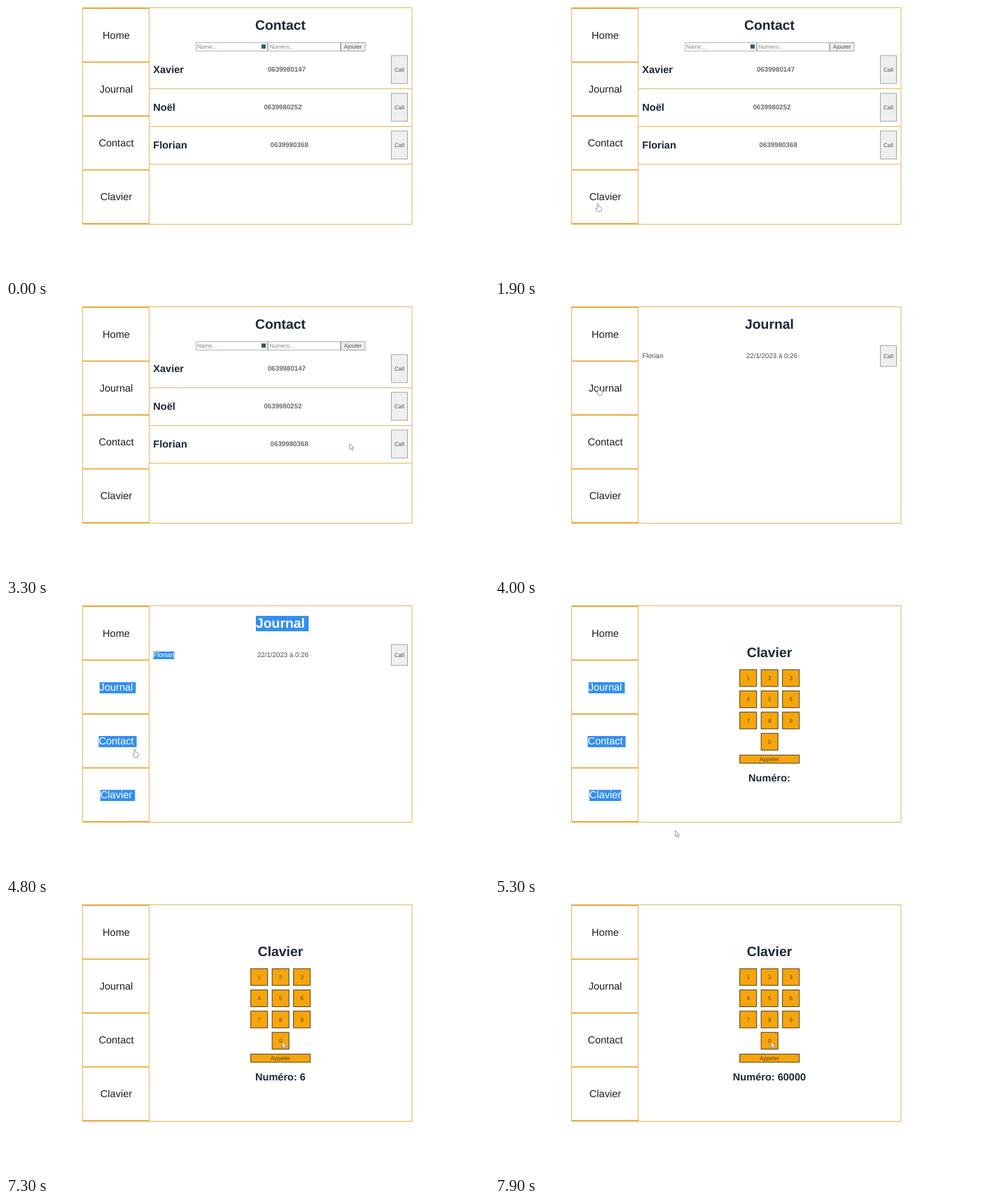
Recreate the animation shown at these times as an HTML page. Size 690 px wide and 388 px high, loop 8000 ms.

```html
<!DOCTYPE html>
<html lang="fr">
<head>
<meta charset="utf-8">
<title>Contact</title>
<style>
  html, body { margin: 0; width: 100%; height: 100%; overflow: hidden; background: #fff; }
  svg { display: block; width: 100vw; height: 100vh; }
  text { font-family: "Liberation Sans", Arial, sans-serif; text-rendering: geometricPrecision; white-space: pre; }
  .line { fill: none; stroke: #eab45c; }
  .bar { fill: none; stroke: #e8a935; stroke-width: 1.8; }
  .h1 { font-size: 19.4px; font-weight: bold; fill: #1b2737; }
  .h2 { font-size: 14.55px; font-weight: bold; fill: #1b2737; }
  .nav { font-size: 14.55px; fill: #1e1e20; }
  .num { font-size: 9.75px; font-weight: bold; fill: #6c6c6c; }
  .plain { font-size: 9.75px; fill: #4c4c4e; }
  .small { font-size: 8.1px; fill: #505050; }
  .hint { font-size: 8.1px; fill: #848484; }
  .btn { fill: #efefef; stroke: #a4a4a4; }
  .field { fill: #fff; stroke: #b6b6b6; }
  .key { fill: #f6a50c; stroke: #4b3d22; }
  .keytext { font-size: 8.1px; fill: #5b4517; }
  .mark { fill: #338ff0; visibility: hidden; }
  .on .mark { visibility: visible; }
  .on text { fill: #fff; }
  .cursor { fill: #fff; stroke: #808084; stroke-width: .8; stroke-linejoin: round; }
</style>
</head>
<body>
<svg id="stage" viewBox="0 0 690 388" xmlns="http://www.w3.org/2000/svg"></svg>
<script>
const LOOP = 8000, FRAME = 100;
const stage = document.getElementById('stage');

const text = (x, y, cls, str, anchor = 'middle') =>
  `<text x="${x}" y="${y}" class="${cls}" text-anchor="${anchor}">${str}</text>`;
const rect = (x, y, w, h, cls) =>
  `<rect x="${x}" y="${y}" width="${w}" height="${h}" class="${cls}"/>`;
const line = (d, cls = 'line') => `<path class="${cls}" d="${d}"/>`;
const group = (id, body) => `<g id="${id}">${body}</g>`;
const selectable = (id, label) => group(id, '<rect class="mark"/>' + label);

function menu() {
  const top = i => 3.3 + 77.1 * i;
  const items = ['Home', 'Journal', 'Contact', 'Clavier'].map((name, i) =>
    line(`M110 ${top(i)}H205`, 'bar') +
    selectable('nav' + i, text(157.5, top(i) + 43.5, 'nav', name)));
  return items.join('') + line(`M110 ${top(4)}H205`, 'bar') + line('M204.5 3V312');
}

function callButton(mid, h) {
  return rect(550.5, mid - h / 2, 23, h, 'btn') + text(562, mid + 2.7, 'small', 'Call');
}

function contactPage() {
  const people = [['Xavier', '0639980147', 401], ['Noël', '0639980252', 395.5], ['Florian', '0639980368', 404.7]];
  const form = rect(271.5, 52.5, 102, 12, 'field') + text(273, 60.5, 'hint', 'Name...', 'start') +
    '<rect x="365" y="55" width="6" height="6" fill="#2f5b68"/>' +
    rect(374.5, 52.5, 103, 12, 'field') + text(376.5, 60.5, 'hint', 'Numero...', 'start') +
    rect(478.5, 52.5, 34.5, 12, 'btn') + text(495.7, 60.5, 'small', 'Ajouter');
  const rows = people.map(([name, number, x], i) => {
    const mid = 91 + 54 * i;
    return text(210.3, mid + 5, 'h2', name, 'start') + text(x, mid + 3.4, 'num', number) +
      callButton(mid, 40) + line(`M205 ${mid + 27.5}H580`);
  });
  return text(392, 34, 'h1', 'Contact') + form + rows.join('');
}

function journalPage() {
  return selectable('title', text(392, 34, 'h1', 'Journal')) +
    selectable('caller', text(210.5, 76, 'plain', 'Florian', 'start')) +
    text(395.5, 76, 'plain', '22/1/2023 à 0:26') + callButton(73, 30);
}

function keypadPage() {
  const keys = [1, 2, 3, 4, 5, 6, 7, 8, 9, 0].map((n, i) => {
    const col = n ? i % 3 : 1, row = Math.floor(i / 3);
    const x = 349.7 + 30.5 * col, y = 94 + 30.4 * row;
    return rect(x, y, 24, 24, 'key') + text(x + 12, y + 14.7, 'keytext', n);
  });
  return text(392, 76, 'h1', 'Clavier') + keys.join('') +
    rect(349.7, 216.3, 85, 11.7, 'key') + text(392, 224.8, 'keytext', 'Appeler') +
    '<text id="dial" x="392" y="254" class="h2" text-anchor="middle"></text>';
}

stage.innerHTML = rect(109.5, 2.5, 470.5, 310, 'line') + menu() +
  group('contact', contactPage()) + group('journal', journalPage()) + group('keypad', keypadPage()) +
  '<g id="pointer" class="cursor">' +
  '<path id="arrow" d="M0 0V8.4L2 6.7L3.5 9.8L4.9 9.1L3.5 6.1H6Z"/>' +
  '<path id="hand" d="M-1 6.6V.8Q0 -.6 1 .8V4.4Q2 3.7 2.6 4.7Q3.6 4.1 4.1 5.1Q5.2 4.8 5.2 6V8.4L4.2 11.4H-.6L-3 7.6Q-3.2 6 -1 7.4Z"/></g>';

const el = {};
stage.querySelectorAll('[id]').forEach(node => el[node.id] = node);

// Texts in selection order; a highlight covers the text and, unless it is last, a space after it.
const runs = ['nav1', 'nav2', 'nav3', 'title', 'caller'].map(id => {
  const [mark, label] = el[id].children;
  const box = label.getBBox();
  ['x', 'y', 'width', 'height'].forEach(k => mark.setAttribute(k, box[k]));
  return { node: el[id], mark, width: box.width, space: parseFloat(getComputedStyle(label).fontSize) * .278 };
});

// time and value from then on
const pages = [[0, 'contact'], [2100, 'keypad'], [2600, 'contact'], [4000, 'journal'], [5100, 'keypad']];
const selection = [[0, 0], [4200, 1], [4300, 4], [4400, 5], [5100, 3], [5500, 0]];
const typed = [[0, 0], [6100, 1], [7700, 3], [7800, 4], [7900, 5]];

const spots = {
  keypad: [147, 283], contact: [184, 208], journal: [148, 118], edge: [589, 206], row: [491, 198.5],
  call: [561, 200], name: [241, 72], below: [257.5, 324.5], six: [422, 139], eight: [397.8, 177.5], zero: [394.5, 199]
};
const route = [
  [1400, 'below'], [1900, 'keypad'], [2100, 'keypad'], [2500, 'contact'], [2600, 'contact'],
  [2800, 'edge'], [3000, 'row'], [3300, 'row'], [3500, 'call'], [3600, 'call'],
  [3900, 'journal'], [4200, 'journal'], [4400, 'name'], [4800, 'contact'], [5100, 'keypad'],
  [5300, 'below'], [5500, 'below'], [5900, 'six'], [6100, 'six'], [6300, 'eight'], [6600, 'zero']
];

const at = (steps, t) => steps.findLast(s => s[0] <= t)[1];
const show = (node, on) => node.style.display = on ? '' : 'none';

function pointerAt(t) {
  const i = route.findLastIndex(r => r[0] <= t);
  if (i < 0) return null;
  const [t0, from] = route[i], [t1, to] = route[i + 1] || [LOOP, from];
  const k = (t - t0) / (t1 - t0), ease = k * k * (3 - 2 * k);
  return spots[from].map((v, j) => v + (spots[to][j] - v) * ease);
}

function drawPointer(pos) {
  show(el.pointer, pos);
  if (!pos) return;
  const [x, y] = pos;
  const overMenu = x > 110 && x < 205 && y > 3 && y < 312;
  show(el.hand, overMenu);
  show(el.arrow, !overMenu);
  el.pointer.setAttribute('transform', `translate(${x} ${y})`);
}

function draw(t) {
  const page = at(pages, t), count = at(selection, t);
  ['contact', 'journal', 'keypad'].forEach(id => show(el[id], id === page));
  runs.forEach((run, i) => {
    run.node.classList.toggle('on', i < count);
    run.mark.setAttribute('width', run.width + (i < count - 1 ? run.space : 0));
  });
  el.dial.textContent = ('Numéro: ' + '60000'.slice(0, at(typed, t))).trim();
  drawPointer(pointerAt(t));
}

const start = performance.now();
function tick() {
  const t = (performance.now() - start) % LOOP;
  draw(Math.floor(t / FRAME) * FRAME);
  requestAnimationFrame(tick);
}
tick();
</script>
</body>
</html>
```
